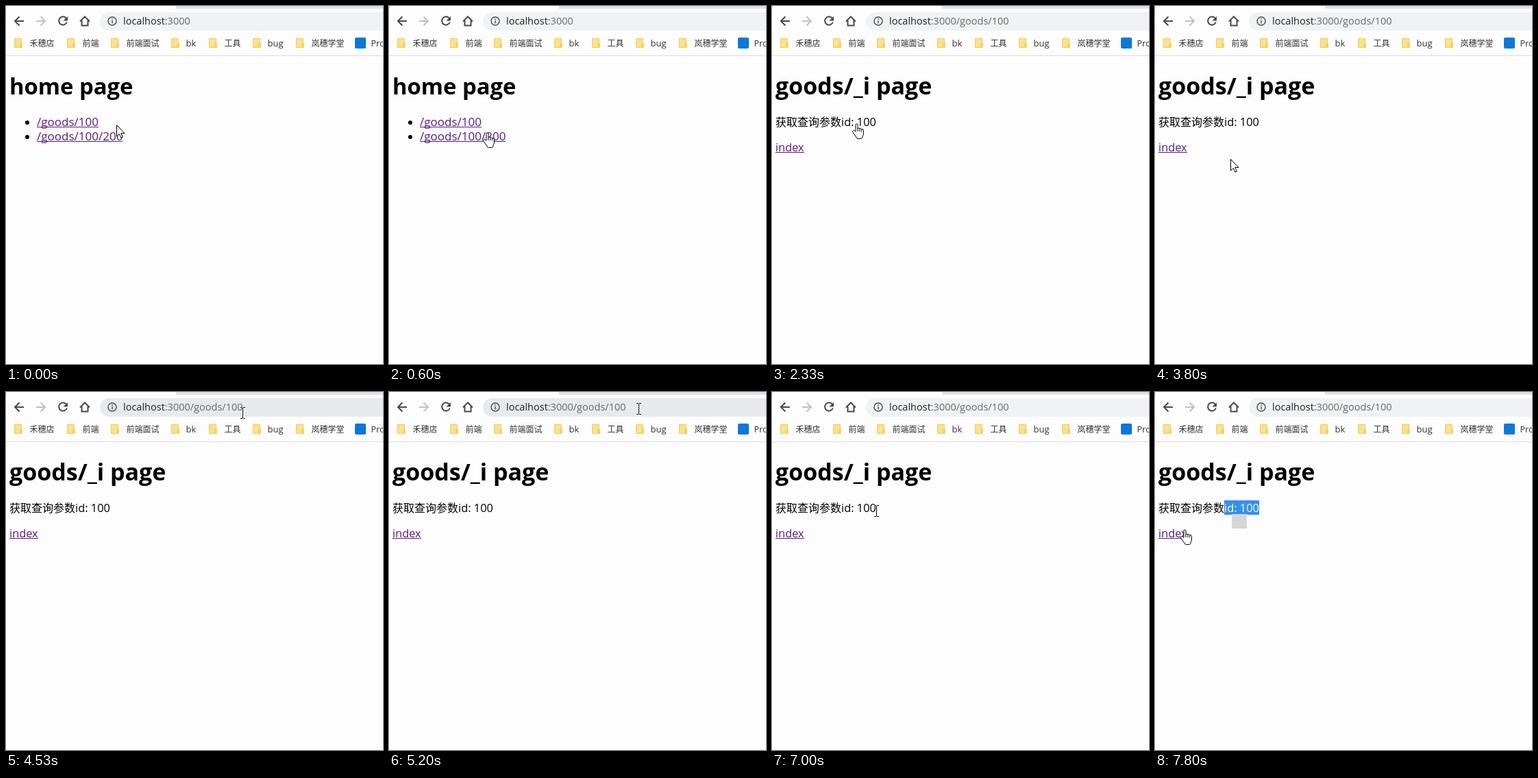
An HTML page with a canvas that plays this animation: 550 by 522 pixels, repeating every 8000 ms.

```html
<!DOCTYPE html>
<html lang="zh-CN">
<head>
<meta charset="utf-8">
<title>home page</title>
<style>
html, body { margin: 0; width: 550px; height: 522px; overflow: hidden; background: #fdfdfd; }
canvas { display: block; }
</style>
</head>
<body>
<canvas id="stage" width="550" height="522"></canvas>
<script>
const ctx = document.getElementById('stage').getContext('2d');
const LOOP = 8000;
const FAMILY = '"Open Sans", "Noto Sans CJK SC", "Noto Sans CJK", sans-serif';
const PAPER = '#fdfdfd', INK = '#000', ICON = '#48494c', LABEL = '#303134', LINK = '#551a8b';

// Pointer hot spot: time, x, y, shape from that time on
const PATH = [
  [0, 161, 173, 'arrow'], [130, 161, 173, 'arrow'], [400, 157, 183, 'hand'],
  [600, 142, 185, 'hand'], [930, 124, 173, 'hand'], [1200, 122, 172, 'hand'],
  [2330, 122, 172, 'hand'], [2400, 121, 182, 'arrow'], [2730, 112, 219, 'arrow'],
  [3200, 110, 227, 'arrow'], [3600, 110, 223, 'arrow'], [3800, 110, 223, 'arrow'],
  [4130, 205, 140, 'arrow'], [4530, 345, 30, 'beam'], [4800, 364, 24, 'beam'],
  [5400, 364, 24, 'beam'], [5530, 342, 36, 'arrow'], [5800, 270, 85, 'arrow'],
  [6000, 213, 120, 'beam'], [6130, 190, 142, 'arrow'], [6330, 162, 167, 'beam'],
  [6800, 155, 173, 'beam'], [7000, 152, 173, 'beam'], [7200, 125, 172, 'beam'],
  [7400, 125, 172, 'beam'], [7530, 101, 170, 'beam'], [7600, 101, 170, 'beam'],
  [7800, 42, 201, 'hand'], [LOOP, 42, 201, 'hand']
];

const OPEN = 2130, FOCUS = 5330, DRAG = 7000, POPUP = 7730;

const BOOKMARKS = [
  [12, '禾穗店'], [89, '前端'], [153, '前端面试'], [241, 'bk'],
  [296, '工具'], [360, 'bug'], [423, '岚穗学堂']
];

const ARROW = new Path2D('M.5 .5V17L4.3 13.4L6.7 19.2L9.2 18.1L6.8 12.5H12Z');
const HAND = new Path2D('M5 12V1.8Q6.5 -.4 8 1.8V7.4Q9.6 6.3 11 7.8Q12.7 7 13.8 8.6' +
  'Q16.5 8.2 16.5 10.5V15Q16.5 17 15 19V20.5Q14.5 22.5 12.5 22.5H8.5Q6.5 22.5 5.8 20' +
  'L1 13.4Q-.2 11.2 1.8 10.4Q3 10.2 5 12.5');
const KNUCKLES = new Path2D('M8 7V12M11 8V12M13.8 9V12.5');

function rect(x, y, w, h, color) {
  ctx.fillStyle = color;
  ctx.fillRect(x, y, w, h);
}

function pill(x, y, w, h, r, color) {
  ctx.beginPath();
  ctx.roundRect(x, y, w, h, r);
  ctx.fillStyle = color;
  ctx.fill();
}

function stroke(path, color, width) {
  ctx.strokeStyle = color;
  ctx.lineWidth = width;
  ctx.stroke(new Path2D(path));
}

function disc(x, y, r, color) {
  ctx.beginPath();
  ctx.arc(x, y, r, 0, Math.PI * 2);
  ctx.fillStyle = color;
  ctx.fill();
}

function text(str, x, y, size, color, weight = 400) {
  ctx.font = `${weight} ${size}px ${FAMILY}`;
  ctx.fillStyle = color;
  ctx.fillText(str, x, y);
  return ctx.measureText(str).width;
}

function link(str, x, y, size) {
  const w = text(str, x, y, size, LINK);
  rect(x, y + 1, Math.round(w), 1, LINK);
}

function pointerAt(t) {
  const i = PATH.findLastIndex(k => k[0] <= t);
  const a = PATH[i], b = PATH[Math.min(i + 1, PATH.length - 1)];
  const p = b === a ? 0 : (t - a[0]) / (b[0] - a[0]);
  const mix = n => Math.round(a[n] + (b[n] - a[n]) * p);
  return { x: mix(1), y: mix(2), shape: a[3] };
}

function drawPointer({ x, y, shape }) {
  ctx.save();
  ctx.lineWidth = 1;
  ctx.strokeStyle = '#000';
  ctx.fillStyle = '#fff';
  if (shape === 'arrow') {
    ctx.translate(x, y);
    ctx.fill(ARROW);
    ctx.stroke(ARROW);
  } else if (shape === 'hand') {
    ctx.translate(x - 5, y - 1);
    ctx.fill(HAND);
    ctx.stroke(HAND);
    ctx.stroke(KNUCKLES);
  } else {
    ctx.globalCompositeOperation = 'difference';
    ctx.fillRect(x, y - 7, 1, 15);
    for (const dy of [-8, 8]) {
      ctx.fillRect(x - 3, y + dy, 3, 1);
      ctx.fillRect(x + 1, y + dy, 3, 1);
    }
  }
  ctx.restore();
}

function drawFolder(x) {
  pill(x, 47, 11, 14, 1, '#ecca62');
  rect(x + 1, 48, 9, 12, '#fee283');
  pill(x + 8, 54, 4, 7, 1, '#f2d26c');
}

function drawToolbar() {
  rect(0, 0, 550, 4, '#dee1e6');
  pill(1, -4, 247, 12, 4, PAPER);
  rect(0, 4, 550, 68, PAPER);
  rect(0, 72, 550, 1, '#dadce0');
  stroke('M26 22H13.5M19.5 15.5L13 22L19.5 28.5', ICON, 2);
  stroke('M44 22H56.5M50.5 15.5L57 22L50.5 28.5', '#bfc0c3', 2);
  stroke('M87.6 17.6A6 6 0 1 0 88.8 23.5', ICON, 2);
  ctx.fillStyle = ICON;
  ctx.fill(new Path2D('M90 15V21.5H83.5Z'));
  stroke('M108 22.5L115 15.5L122 22.5M110.5 21V28.5H119.5V21', ICON, 2);

  for (const [x, name] of BOOKMARKS) {
    drawFolder(x);
    const latin = /^[a-z]/.test(name);
    text(name, x + (latin ? 21.5 : 22.5), 59, latin ? 13 : 12, LABEL);
  }
  pill(509, 46, 16, 16, 2, '#0a78dc');
  text('Pro', 532.5, 59, 12.5, LABEL);
}

function drawAddress(path, focused, hovered) {
  if (focused) {
    pill(136, 8, 440, 29, 14.5, '#3f86dc');
    pill(138, 10, 440, 25, 12.5, PAPER);
    rect(171, 12, 176, 20, '#9fc9f3');
  } else {
    pill(137, 9, 440, 27, 13.5, hovered ? '#e7e9ec' : '#f0f2f3');
  }
  stroke('M161 22A6 6 0 1 1 149 22A6 6 0 1 1 161 22M155 21V25.5M155 18.2V19.8', ICON, 1.4);
  const w = text('localhost', 171, 27, 14.5, '#202124');
  text(':3000' + path, 171 + w, 27, 14.5, focused ? '#202124' : '#66696e');
}

function drawHome() {
  text('home page', 5, 129, 32.8, INK, 700);
  disc(31, 170, 3, INK);
  disc(31, 191, 3, INK);
  link('/goods/100', 45, 175, 17);
  link('/goods/100/200', 45, 196, 17);
}

function drawGoods(t, pointer) {
  text('goods/_i page', 5, 129, 34, INK, 700);
  text('获取查询参数', 5, 175, 16, INK);
  const label = 'id: 100';
  text(label, 101, 175, 16.4, INK);
  link('index', 5, 212, 16.4);
  if (t < DRAG) return;

  // Selection grows leftwards in whole characters
  ctx.font = `16.4px ${FAMILY}`;
  let from = 101;
  for (let n = 1; n <= label.length; n++) {
    const edge = 101 + ctx.measureText(label.slice(0, n)).width;
    if (t < 7530 && edge <= pointer.x + 3) from = edge;
  }
  ctx.save();
  ctx.beginPath();
  ctx.rect(from, 158, 152 - from, 21);
  ctx.clip();
  rect(101, 158, 51, 21, '#3390f2');
  text(label, 101, 175, 16.4, '#fff');
  ctx.restore();
  if (t >= POPUP) rect(112, 178, 22, 21, '#d6d6d6');
}

function draw(now) {
  const time = now % LOOP;
  const rest = time % 200;
  const t = time - rest + (rest >= 130 ? 130 : 0);
  const pointer = pointerAt(t);
  const home = t < OPEN;
  rect(0, 0, 550, 522, PAPER);
  drawToolbar();
  drawAddress(home ? '' : '/goods/100', t >= FOCUS && t < DRAG, pointer.y < 36);
  if (home) drawHome();
  else drawGoods(t, pointer);
  drawPointer(pointer);
}

const start = performance.now();
function tick() {
  draw(performance.now() - start);
  requestAnimationFrame(tick);
}
tick();
</script>
</body>
</html>
```
